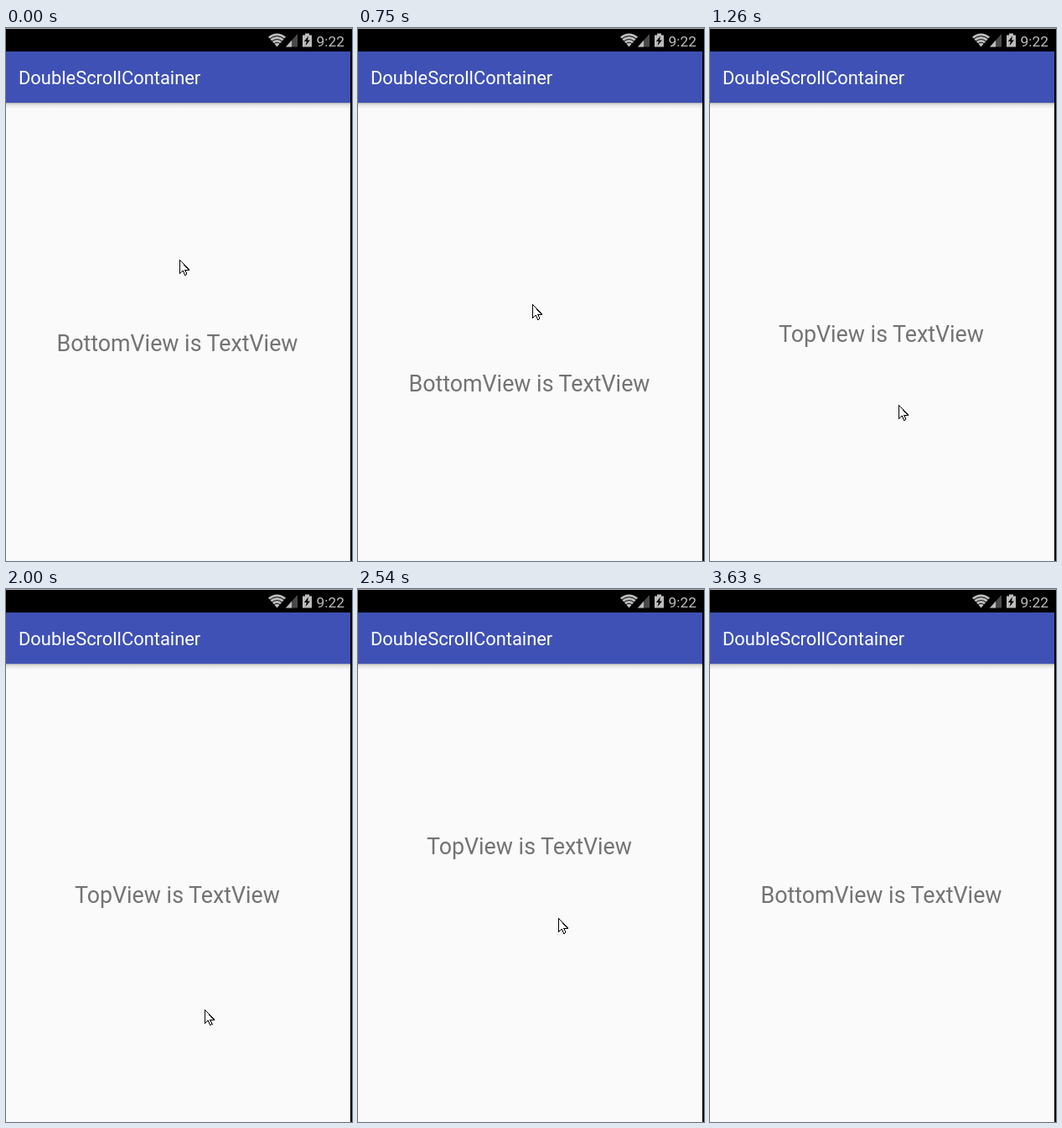
Recreate the animation shown at these times as an HTML page. Size 413x635 px, loop 3.92 s.

```html
<!DOCTYPE html>
<html lang="en">
<head>
<meta charset="utf-8">
<title>DoubleScrollContainer</title>
<style>
  html, body { margin: 0; width: 100%; height: 100%; overflow: hidden; background: #fafafa; }
  svg { display: block; width: 413px; height: 635px; font-family: Roboto, "Noto Sans", sans-serif; }
  .view { font-size: 26.8px; fill: #737373; text-anchor: middle; }

  /* Each leg is shown in a few held steps; the default is a single step. */
  #pages, #cursor { animation: scroll 3.92s step-end infinite; }
  #cursor { animation-name: point; shape-rendering: crispEdges; }

  /* 0 shows the top view, -545px the bottom view */
  @keyframes scroll {
    0%      { translate: 0 -534px; animation-timing-function: steps(3); }
    9.183%  { translate: 0 -504px; animation-timing-function: steps(3); }
    19.132% { translate: 0 -486px; }
    22.193% { translate: 0 -465px; }
    26.02%  { translate: 0 -38px; animation-timing-function: steps(2); }
    32.142% { translate: 0 0; }
    54.081% { translate: 0 0; animation-timing-function: steps(2); }
    60.969% { translate: 0 -20px; }
    64.795% { translate: 0 -58px; }
    68.622% { translate: 0 -184px; }
    71.683% { translate: 0 -525px; }
    75.51%, 100% { translate: 0 -545px; }
  }
  @keyframes point {
    0%      { translate: 207px 276px; animation-timing-function: steps(3); }
    9.183%  { translate: 208px 300px; animation-timing-function: steps(3); }
    19.132% { translate: 208px 329px; animation-timing-function: steps(4); }
    32.142% { translate: 225px 449px; animation-timing-function: steps(2); }
    39.285% { translate: 240px 481px; }
    51.02%  { translate: 237px 501px; animation-timing-function: steps(3); }
    60.969% { translate: 238px 455px; }
    64.795% { translate: 239px 392px; animation-timing-function: steps(2); }
    71.683% { translate: 245px 317px; animation-timing-function: steps(3); }
    81.632% { translate: 268px 415px; animation-timing-function: steps(2); }
    88.775% { translate: 384px 619px; }
    92.602%, 100% { translate: 384px 640px; }
  }
</style>
</head>
<body>
<svg viewBox="0 0 413 635">
  <defs>
    <linearGradient id="shade" x2="0" y2="1">
      <stop offset="0" stop-color="#000" stop-opacity=".32"/>
      <stop offset=".3" stop-color="#000" stop-opacity=".1"/>
      <stop offset="1" stop-color="#000" stop-opacity="0"/>
    </linearGradient>
  </defs>

  <rect width="413" height="635" fill="#fafafa"/>
  <g id="pages" class="view">
    <text x="204.5" y="374">TopView is TextView</text>
    <text x="204.5" y="919">BottomView is TextView</text>
  </g>

  <rect y="89" width="411" height="7" fill="url(#shade)"/>
  <rect y="28" width="411" height="61" fill="#3f51b5"/>
  <text x="15" y="67" font-size="21.9" fill="#fff">DoubleScrollContainer</text>

  <rect width="413" height="1" fill="#b4b4b4"/>
  <rect y="1" width="413" height="27" fill="#000"/>
  <rect x="411" y="1" width="2" height="634" fill="#000"/>
  <g fill="#bdbdbd">
    <path d="M323.5 22.5 313 10.6Q323.5 2.6 334 10.6Z"/>
    <path d="M314.5 13.2Q323.5 6 332.5 13.2M317 16.2Q323.5 10.8 330 16.2M319.5 19Q323.5 15.6 327.5 19"
          fill="none" stroke="#000"/>
    <path d="M348 7V22.5H334Z" fill="#4a4a4a"/>
    <path d="M341 14.7V22.5H334Z"/>
    <path d="M357 6.5h5v2h3v14h-11v-14h3Z"/>
    <path d="M361 9.5 355.8 16h3L357.5 21 363 14.4h-3Z" fill="#000"/>
    <text x="370.6" y="21.5" font-size="17.4">9:22</text>
  </g>

  <path id="cursor" d="M.5 .5V16.5L4.2 13 6.8 18.5 9 17.5 6.6 12.2H11.5Z"
        fill="#fff" stroke="#000" stroke-linejoin="round"/>
</svg>
</body>
</html>
```
